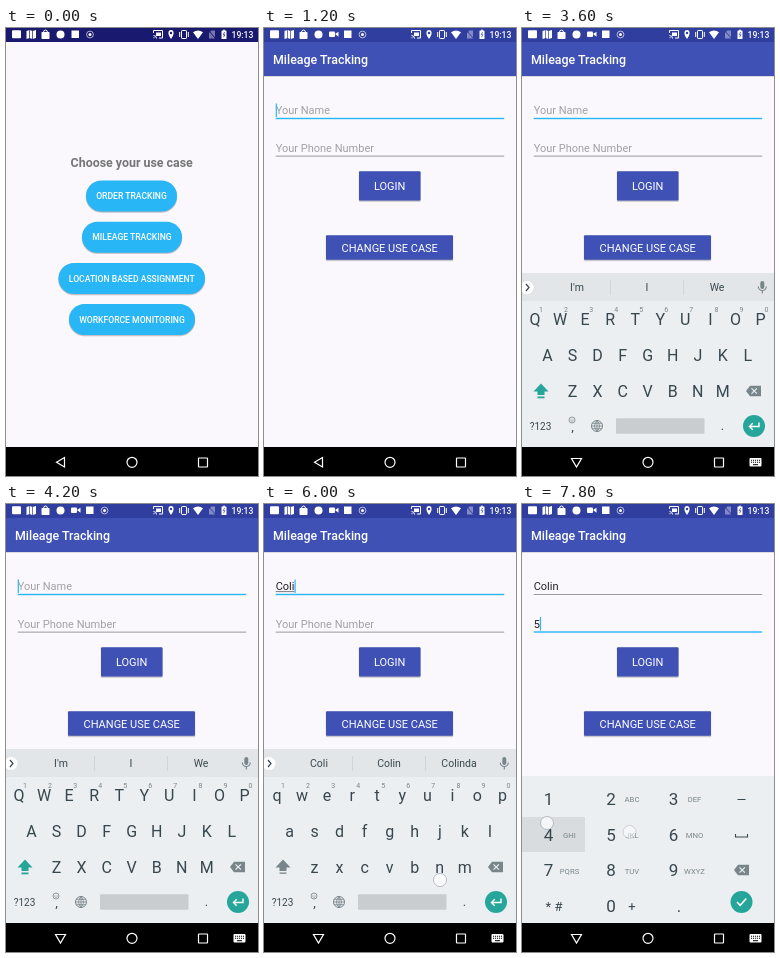
These frames come from a looping animation (252 px wide and 448 px high, 8000 ms). An HTML page:

```html
<!DOCTYPE html>
<html lang="en">
<head>
<meta charset="utf-8">
<title>Use case demo</title>
<style>
html, body { margin: 0; height: 100%; overflow: hidden; background: #faf8fc; }
svg { display: block; width: 100vw; height: 100vh; font-family: Roboto, sans-serif; }
</style>
</head>
<body>
<svg id="stage" viewBox="0 0 252 448"></svg>
<script>
const LOOP = 8000, STEP = 200;
const INK = '#37474f', GREY = '#78858b', INDIGO = '#3f51b5', BLUE = '#29b6f6', TEAL = '#26a69a';
const stage = document.getElementById('stage');

const text = (x, y, size, str, fill = INK, anchor = 'middle', extra = '') =>
  `<text x="${x}" y="${y}" font-size="${size}" fill="${fill}" text-anchor="${anchor}" ${extra}>${str}</text>`;
const rect = (x, y, w, h, fill, r = 0, extra = '') =>
  `<rect x="${x}" y="${y}" width="${w}" height="${h}" rx="${r}" fill="${fill}" ${extra}/>`;
const circle = (x, y, r, fill, extra = '') => `<circle cx="${x}" cy="${y}" r="${r}" fill="${fill}" ${extra}/>`;
const fillPath = (d, fill) => `<path d="${d}" fill="${fill}"/>`;
const line = (d, color, width = 1) => `<path d="${d}" fill="none" stroke="${color}" stroke-width="${width}"/>`;
const at = (x, y, body) => `<g transform="translate(${x} ${y})">${body}</g>`;
const shadowed = (x, y, w, h, fill, r) =>
  rect(x - .3, y + .5, w + .6, h + .9, '#000', r, 'opacity=".13"') +
  rect(x, y + .4, w, h + .4, '#000', r, 'opacity=".15"') + rect(x, y, w, h, fill, r);
const touch = (x, y, opacity = 1) =>
  circle(x, y, 6.5, '#fff', `fill-opacity=".75" stroke="#a5aeb8" stroke-width=".8" opacity="${opacity}"`);

// Latest entry of a [time, value] list that has started by time t
const latest = (track, t) => track.reduce((value, [start, next]) => t >= start ? next : value, track[0][1]);
const within = (t, from, to) => t >= from && t < to;

const caretTrack = [[0, true], [1600, false], [2000, true], [2600, false], [3000, true],
  [3600, false], [4200, true], [7400, false], [7800, true]];
const nameTrack = [[0, ''], [4800, 'C'], [5200, 'Co'], [5600, 'Col'], [5800, 'Coli'], [6200, 'Colin']];
const hints = {
  '': ["I'm", 'I', 'We'], C: ['C', 'Can', 'Call'], Co: ['Co', 'Come', 'Could'],
  Col: ['Col', 'Cold', 'Color'], Coli: ['Coli', 'Colin', 'Colinda'], Colin: ['Colin', 'Colinda', 'Coling']
};
const taps = [[1000, 126, 209], [2600, 60, 84], [4600, 101, 371], [5000, 213, 298],
  [5400, 226, 334], [5600, 188, 298], [6000, 176, 376], [6800, 232, 402]];

function statusBar(t, color) {
  const w = '#fff';
  const shift = t < 200 ? 0 : 14.5;
  const camera = rect(65, 3.5, 6, 5.5, w, 1) + fillPath('M71 6l3.5-2.3v5z', w);
  const pin = fillPath('M165 11C161.500 6.500 161.600 2 165 2S168.500 6.500 165 11z', w) + circle(165, 5, 1.2, color);
  const battery = rect(215.500, 2.500, 5, 8.5, w, .6) + rect(217, 1.7, 2, 1, w) + line('M218.600 4l-1.400 2.700h1.700l-1.400 2.500', color, .7);
  return rect(0, 0, 252, 14, color) +
    rect(6, 2.300, 9, 8, w, 1) +
    fillPath('M20.500 3l3-1 3 1 3.500-1v8l-3.500 1-3-1-3 1z', w) + line('M23.500 2v8M26.500 3v8', color, .7) +
    rect(35.500, 4, 8, 7, w, .7) + line('M37.500 4.500a2 2.500 0 0 1 4 0', w) +
    circle(54.500, 6.500, 4, w) + (shift ? camera : '') + rect(65.500 + shift, 2.500, 7.5, 7.5, w) +
    circle(84 + shift, 6.500, 3.400, 'none', `stroke="${w}" stroke-width=".8" opacity=".8"`) +
    circle(84 + shift, 6.500, 1.500, w) +
    line('M147.500 5V2.500h9V10H153M147.500 9.700h1M147.500 7.500a3 3 0 0 1 3 3', w) + rect(150, 4.500, 5, 3.5, w) +
    pin + rect(175.500, 2.500, 5, 8, 'none', .7, `stroke="${w}"`) + line('M173.700 4v5M182.300 4v5', w) +
    fillPath('M187 4.300Q192 .5 197 4.300L192 11z', w) +
    `<g opacity=".4">${fillPath('M203 5l2.500-2.500h3.500v8h-6z', w)}${line('M202 2l8 9', color)}</g>` +
    battery + text(225.500, 9.800, 8.6, '19:13', w, 'start', 'font-weight="500"');
}

function navBar(typing) {
  const back = typing ? 'M49.500 430.500h10L54.500 439z' : 'M58.500 429.500v9.500L50.500 434.200z';
  const keyboardIcon = rect(227.500, 430, 12, 8.5, '#fff', 1) +
    line('M229 432.200h9M229 434.300h9', '#000', '1.100" stroke-dasharray="1.1 .9') + line('M231 436.700h5', '#000');
  return rect(0, 419, 252, 29, '#000') + line(back, '#fff', 1.2) +
    circle(126, 434.300, 5, 'none', 'stroke="#fff" stroke-width="1.2"') +
    rect(192.500, 430, 9, 9, 'none', .5, 'stroke="#fff" stroke-width="1.2"') + (typing ? keyboardIcon : '');
}

function home() {
  const buttons = [[80, 152.500, 91, 'ORDER TRACKING'], [76, 193.700, 100, 'MILEAGE TRACKING'],
    [52.500, 235, 146.500, 'LOCATION BASED ASSIGNMENT'], [63, 276, 126, 'WORKFORCE MONITORING']];
  return text(125.700, 139.300, 12.4, 'Choose your use case', '#757575', 'middle', 'font-weight="700"') +
    buttons.map(([x, y, w, label]) => shadowed(x, y, w, 31, BLUE, 15.5) +
      text(x + w / 2, y + 18.700, 8.6, label, '#fff', 'middle', 'font-weight="500"')).join('');
}

function field(baseline, value, hint, focused, composing) {
  const y = baseline + 4.500;
  return text(11.700, baseline, 11, value || hint, value ? '#222' : '#a3a1a6', 'start', value && focused ? 'id="value"' : '') +
    (composing ? '<path id="composing" stroke="#444" stroke-width=".7"/>' : '') +
    rect(11.700, y - (focused ? .7 : .3), 228.500, focused ? 1.4 : .8, focused ? BLUE : '#858389');
}

function form(t, name, phone) {
  const onPhone = t >= 7000;
  const caret = latest(caretTrack, t) ? rect(11.700, onPhone ? 113 : 75.500, 1.2, 13.5, BLUE, 0, 'id="caret"') : '';
  return rect(0, 14, 252, 35, '#000', 0, 'opacity=".12"') + rect(0, 14, 252, 34, INDIGO) +
    text(9, 35.700, 12.4, 'Mileage Tracking', '#fff', 'start', 'font-weight="500"') +
    field(86, name, 'Your Name', !onPhone, name && !onPhone) +
    field(123.500, phone, 'Your Phone Number', onPhone, false) + caret +
    shadowed(95, 143.300, 61.500, 29.2, INDIGO, 1) + text(125.700, 162, 11, 'LOGIN', '#fff') +
    shadowed(62, 207.300, 127, 24.5, INDIGO, 1) + text(125.700, 223.600, 11, 'CHANGE USE CASE', '#fff');
}

const backspace = (x, y) => at(x, y, fillPath('M-8 0l4-5.300H7v10.600H-4z', GREY) + line('M-2.500-2.700l5.400 5.400M2.900-2.700l-5.400 5.400', '#eceff1', 1.2));

function letterKeys(t, name) {
  const upper = !name;
  const rows = [['qwertyuiop', 13, 297], ['asdfghjkl', 25.500, 333], ['zxcvbnm', 50.500, 369]];
  const keys = rows.map(([letters, x0, y], row) => [...letters].map((c, i) => {
    const x = x0 + i * 25.050;
    return text(x, y, 16, upper ? c.toUpperCase() : c) +
      (row ? '' : text(x + 6, 284, 7, (i + 1) % 10, GREY));
  }).join('')).join('');
  const mic = rect(238.300, 253, 4, 8, GREY, 2) + line('M236.300 258.500a4 4 0 0 0 8 0M240.300 262.500v3', GREY, 1.1);
  const strip = t < 3600 ? '' : circle(5, 259.500, 7, '#fff', 'stroke="#d5d9db" stroke-width=".5"') +
    line('M4 256l3 3.500-3 3.500', INK, 1.2) + line('M88.500 252v15M161.500 252v15', '#c9ced1', .7) +
    hints[name].map((word, i) => text(55 + i * 70, 263.200, 10.5, word)).join('');
  const shiftColor = upper ? TEAL : GREY;
  const shift = at(19, 363, fillPath('M0-7.500L7.500.5H3.500V4h-7V.5h-4z', shiftColor) + (upper ? rect(-3.500, 5.500, 7, 1.8, TEAL) : rect(-3.500, 5.500, 7, 1.3, GREY)));
  const smiley = at(50, 392, circle(0, 0, 3, 'none', `stroke="${GREY}" stroke-width=".8"`) +
    line('M-1.500.600Q0 2.200 1.500.600M-1.100-1.200v.8M1.100-1.200v.8', GREY, .7));
  const globe = at(75, 398, circle(0, 0, 5.500, 'none', `stroke="${GREY}"`) +
    line('M-5.500 0h11M0-5.500v11M-4.800-2.700h9.600M-4.800 2.700h9.600M0-5.500q-5 5.500 0 11M0-5.500q5 5.500 0 11', GREY, .8));
  const enter = at(232, 398, circle(0, 0, 11, TEAL) + line('M5-3.500V.5H-4.500M-1.300-2.700L-4.500.5l3.200 3.200', '#fff', 1.4));
  return rect(0, 245, 252, 174, '#eceff1') + rect(0, 245, 252, 28, '#e2e6e8') + strip + mic + keys + shift +
    backspace(232, 363) + text(18.500, 401.700, 10, '?123') + smiley + text(50.500, 403, 13, ',') + globe +
    rect(94, 390.300, 88.500, 15.5, '#c9cdcf', 1) + text(200.500, 402, 13, '.') + enter;
}

function numberKeys(pressed) {
  const labels = ['', 'ABC', 'DEF', 'GHI', 'JKL', 'MNO', 'PQRS', 'TUV', 'WXYZ'];
  const digits = labels.map((label, i) => {
    const x = 26.500 + i % 3 * 62.500, y = 301 + Math.floor(i / 3) * 35.700;
    return text(x, y, 17, i + 1) + text(x + 21, y - 2.700, 7.7, label, GREY);
  }).join('');
  const check = at(219.500, 398, circle(0, 0, 11, TEAL) + line('M-4.500 0l3.200 3.300L4.800-3.500', '#fff', 1.5));
  return rect(0, 272, 252, 147, '#eceff1') + (pressed ? rect(0, 313, 63, 35, '#d8dcde') : '') + digits +
    line('M215.500 295.500h8M213.500 330v3h12v-3', INK, 1.1) + backspace(220, 366) + check +
    text(32, 407, 13, '* #') + text(89, 408, 17, '0') + text(110, 407, 13, '+') + text(157, 408, 17, '.');
}

function render(t) {
  const onHome = t < 1200;
  const name = latest(nameTrack, t);
  const phone = t >= 7800 ? '5' : '';
  let scene = rect(0, 0, 252, 448, '#faf8fc') + statusBar(t, onHome ? '#191970' : '#303f9f');
  scene += onHome ? home() : form(t, name, phone);
  if (t >= 7000) scene += numberKeys(phone);
  else if (t >= 3000) scene += letterKeys(t, name);
  scene += navBar(t >= 2600);
  for (const [start, x, y] of taps) if (within(t, start, start + STEP)) scene += touch(x, y);
  if (phone) scene += touch(25, 319) + touch(107.500, 328, .6);
  stage.innerHTML = scene;

  const value = document.getElementById('value');
  const caret = document.getElementById('caret');
  const underline = document.getElementById('composing');
  const end = value ? 11.7 + value.getComputedTextLength() : 11.7;
  if (caret) caret.setAttribute('x', end);
  if (underline) underline.setAttribute('d', `M11.7 87.6H${end}`);
}

let shown = -1;
const origin = performance.now();
function tick() {
  const t = Math.floor((performance.now() - origin) % LOOP / STEP) * STEP;
  if (t !== shown) render(shown = t);
  requestAnimationFrame(tick);
}
tick();
</script>
</body>
</html>
```
